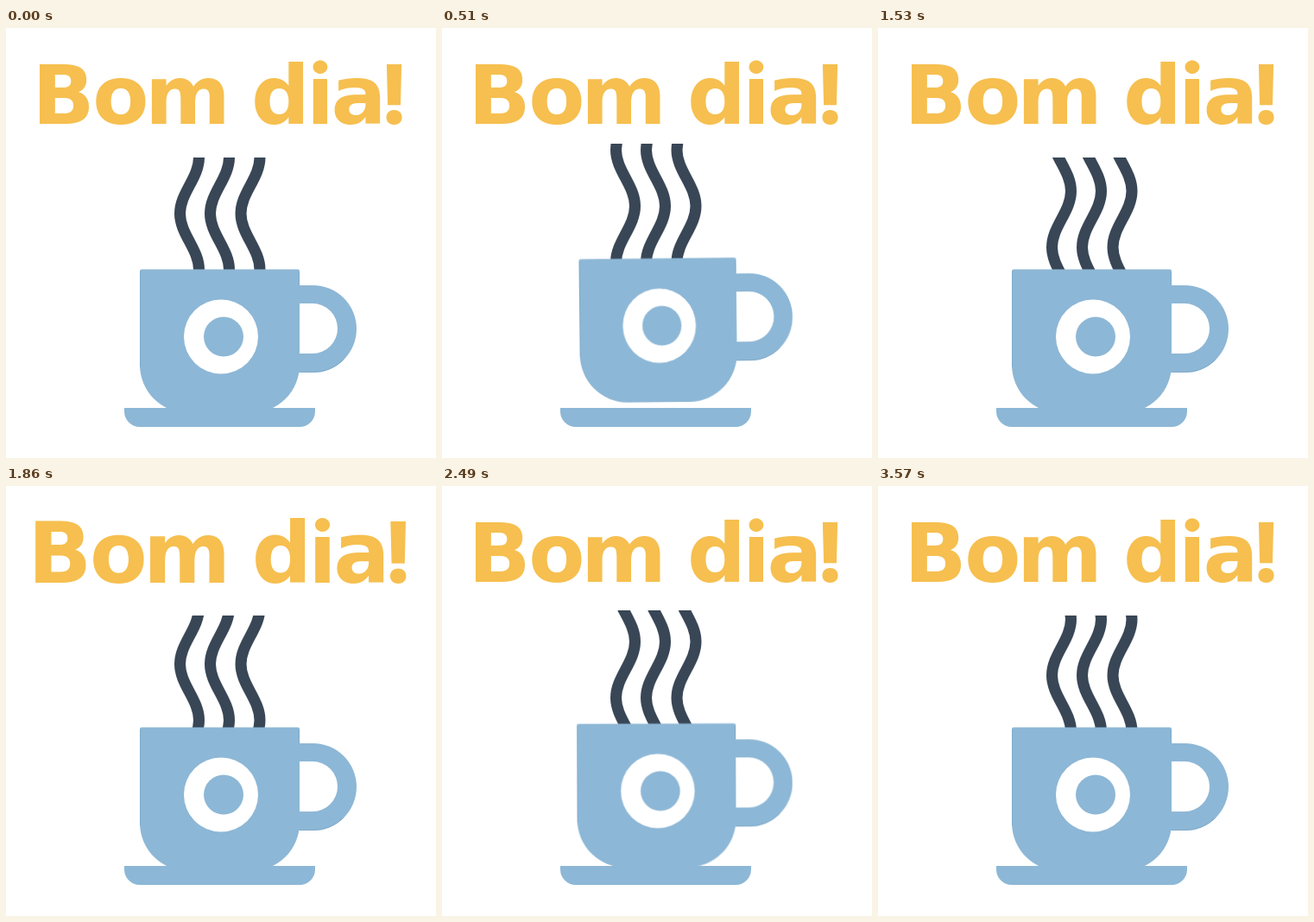
These frames come from a looping animation (498 by 498 pixels, 3600 ms). An HTML page:

```html
<!DOCTYPE html>
<html lang="pt">
<head>
<meta charset="utf-8">
<title>Bom dia!</title>
<style>
  html, body { margin: 0; width: 100%; height: 100%; overflow: hidden; background: #fff; }
  svg { position: absolute; left: 0; top: 0; width: 498px; height: 498px; }

  .title {
    font: 700 95px "DejaVu Sans", sans-serif;
    fill: #f6bf4f;
    text-anchor: middle;
    transform-origin: 249px 74px;
    animation: pulse 1.8s infinite ease-in-out;
  }
  .round { font-family: Inter, sans-serif; font-weight: 800; }
  .steam { animation: window 1.8s infinite ease-in-out; }
  .waves {
    fill: none;
    stroke: #384656;
    stroke-width: 13;
    animation: rise .9s infinite linear;
  }
  .blue { fill: #8db7d6; }
  .edge { fill: none; stroke: #7fabcb; stroke-width: 1; }
  .cup { transform-origin: 405px 340px; animation: hop 1.8s infinite ease-in-out; }
  .saucer { animation: dip 1.8s infinite ease-in-out; }

  @keyframes pulse {
    0%, 20%, 100% { transform: scale(1); }
    10% { transform: scale(1.095); }
  }
  @keyframes rise {
    to { transform: translateY(-130px); }
  }
  @keyframes window {
    0%, 20%, 41%, 48.3%, 100% { clip-path: inset(150px 0 198px 0); }
    33.3% { clip-path: inset(129px 0 198px 0); }
    44% { clip-path: inset(158px 0 198px 0); }
  }
  @keyframes hop {
    0%, 20%, 41%, 48.3%, 100% { transform: translateY(0) rotate(0deg) scaleX(1); }
    33.3% { transform: translateY(-20px) rotate(-.85deg) scaleX(.977); }
    44% { transform: translateY(8px) rotate(0deg) scaleX(1); }
  }
  @keyframes dip {
    0%, 41%, 48.3%, 100% { transform: translateY(0); }
    44% { transform: translateY(8px); }
  }
</style>
</head>
<body>
<svg class="steam" viewBox="0 0 498 498">
  <g class="waves">
    <path id="wave" d="M201.5 85c0 23.7 22 41.3 22 65s-22 41.3-22 65s22 41.3 22 65s-22 41.3-22 65s22 41.3 22 65s-22 41.3-22 65"/>
    <use href="#wave" x="35"/>
    <use href="#wave" x="70.5"/>
  </g>
</svg>

<svg viewBox="0 0 498 498">
  <text class="title" y="111" x="66.5 133 210.5 0 318 364 408.5 449.5">Bom d<tspan class="round">i</tspan>a<tspan class="round">!</tspan></text>

  <path class="saucer blue" d="M137 440H358V444a18 18 0 0 1-18 18H155a18 18 0 0 1-18-18Z"/>

  <g class="cup">
    <path class="blue" d="M157 279.5H338a2 2 0 0 1 2 2V390a56 56 0 0 1-56 56H211a56 56 0 0 1-56-56V281.5a2 2 0 0 1 2-2Z"/>
    <path class="blue" d="M339 298H355.5a50.5 50.5 0 0 1 0 101H339V377H355a29 29 0 0 0 0-58H339Z"/>
    <path class="edge" d="M155.5 393V282M339.5 282V298M340 398.5H355.5a50 50 0 0 0 35-14"/>
    <circle cx="249" cy="357.5" r="43" fill="#fff"/>
    <circle class="blue" cx="252" cy="357.5" r="23"/>
  </g>
</svg>
</body>
</html>
```
